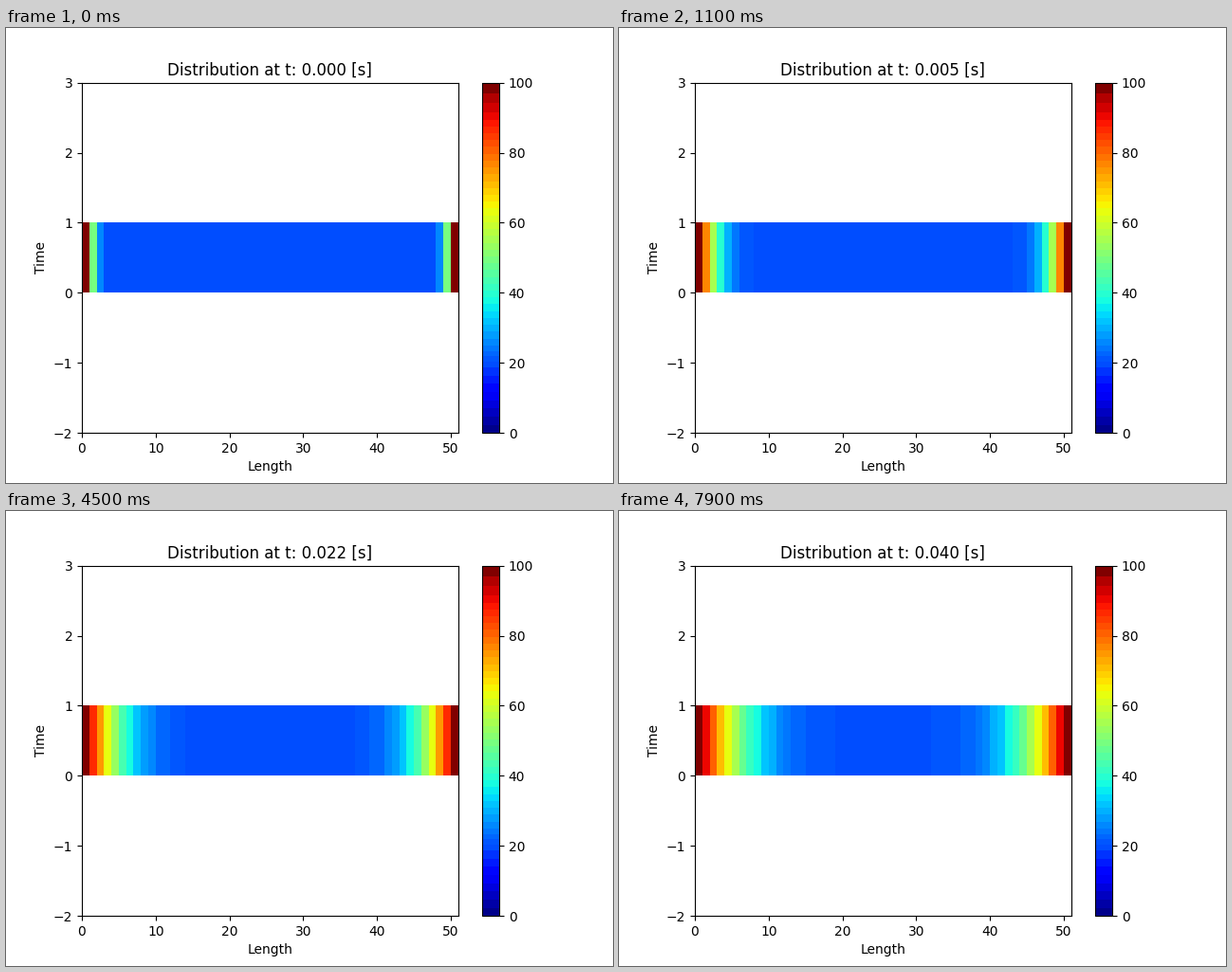
A matplotlib script that plays this animation: 640x480 px, repeating every 8000 ms.

```python
import numpy as np
import matplotlib.pyplot as plt
from matplotlib.animation import FuncAnimation
from matplotlib.colors import ListedColormap

CELLS = 51
FRAMES = 80
DT = 0.0005       # seconds of simulated time per frame
DIFFUSION = 0.25  # a * dt / dx**2
WARMUP = 2        # steps already taken at t = 0
EDGE, START = 100.0, 20.0


def banded_jet():
    """Jet in flat bands, each one the mean of the levels it covers."""
    levels = plt.get_cmap("jet", 256)(np.arange(256))
    edges = np.r_[0:48:6, 48:64:4, 64:234:5, 234:256:7, 256]
    colors = levels.copy()
    for lo, hi in zip(edges[:-1], edges[1:]):
        colors[lo:hi] = levels[lo:hi].mean(axis=0)
    colors[48:52] = levels[51]
    colors[248:] = levels[255]
    return ListedColormap(colors)


def solve():
    """Temperature of the rod at every frame."""
    u = np.full(CELLS, START)
    u[[0, -1]] = EDGE
    history = []
    for _ in range(FRAMES + WARMUP):
        history.append(u.copy())
        u[1:-1] += DIFFUSION * np.diff(u, 2)
    return history[WARMUP:]


history = solve()

fig, ax = plt.subplots(figsize=(6.4, 4.8), dpi=100)
mesh = ax.pcolormesh([history[0]], cmap=banded_jet(), vmin=0, vmax=100)
fig.colorbar(mesh, ax=ax)
ax.set_ylim(-2, 3)
ax.set_xlabel("Length")
ax.set_ylabel("Time")
title = ax.set_title("")


def update(frame):
    mesh.set_array(history[frame][np.newaxis])
    title.set_text(f"Distribution at t: {frame * DT:.3f} [s]")
    return mesh, title


anim = FuncAnimation(fig, update, frames=FRAMES, interval=100, repeat=True)
plt.show()
```
